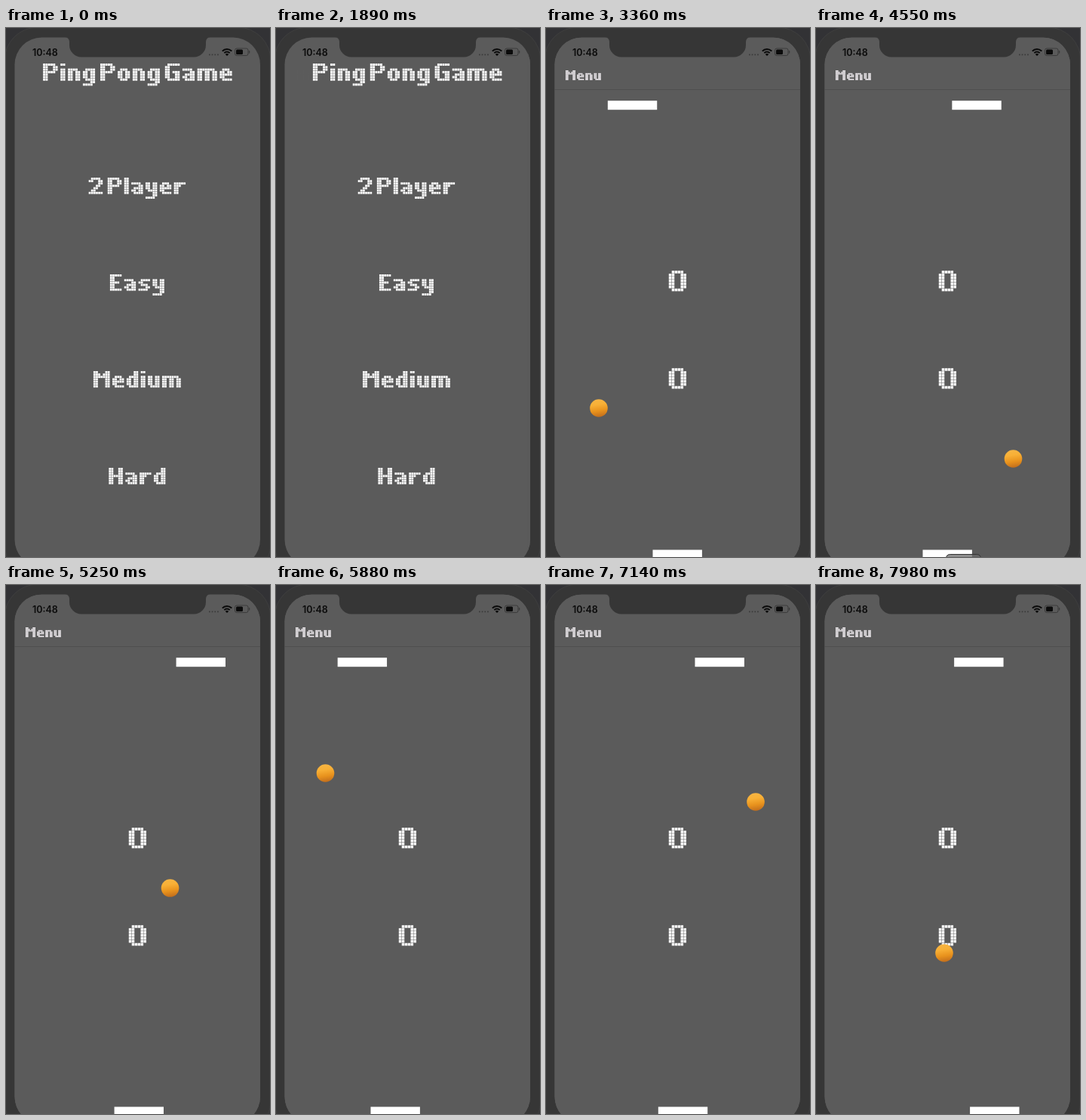
These frames come from a looping animation (350x700 px, 8 s). An HTML page with a canvas:

```html
<!DOCTYPE html>
<html lang="en">
<head>
<meta charset="utf-8">
<title>Ping Pong Game</title>
<style>
html, body { margin: 0; height: 100%; overflow: hidden; background: #363636; }
canvas { display: block; width: 350px; height: 700px; }
</style>
</head>
<body>
<canvas id="stage" width="350" height="700"></canvas>
<script>
const ctx = document.getElementById('stage').getContext('2d');
const LOOP = 8000, STEP = 70, SCREEN = '#5b5b5b', BEZEL = '#363636';

// Stroke font: each word is a polyline of "xy" grid points, "," lifts the pen.
// The pen is two cells wide and one cell high.
const GLYPHS = {
  P: '06 00 30 41 42 33 03', E: '30 00 06 36 , 03 23', M: '06 00 22 32 50 56',
  G: '40 10 01 05 16 46 43 33', H: '00 06 , 03 43 , 40 46',
  a: '02 22 33 36 16 05 14 34', d: '30 36 16 05 03 12 32',
  e: '36 16 05 03 12 22 33 34 04', g: '36 16 05 03 12 32 37 28 08',
  i: '00 00 , 02 06', l: '00 06', m: '06 02 52 63 66 , 33 36',
  n: '06 02 22 33 36', o: '12 22 33 35 26 16 05 03 12', r: '06 02 , 13 22 32',
  s: '32 12 03 14 24 35 26 06', u: '02 05 16 36 32',
  y: '02 04 15 35 , 32 37 28 08',
  0: '10 30 41 45 36 16 05 01 10', 2: '01 10 30 41 42 06 46'
};

function rasterize(strokes) {
  const cells = new Set();
  for (const stroke of strokes.split(' , ')) {
    const points = stroke.split(' ').map(p => [+p[0], +p[1]]);
    for (let i = 1; i < points.length; i++) {
      const [x0, y0] = points[i - 1], [x1, y1] = points[i];
      const n = Math.max(Math.abs(x1 - x0), Math.abs(y1 - y0), 1);
      for (let k = 0; k <= n; k++) {
        const x = Math.round(x0 + (x1 - x0) * k / n);
        const y = Math.round(y0 + (y1 - y0) * k / n);
        cells.add(x + ' ' + y).add(x + 1 + ' ' + y);
      }
    }
  }
  const list = [...cells].map(c => c.split(' ').map(Number));
  return { list, advance: Math.max(...list.map(c => c[0])) + 2 };
}
const font = { ' ': { list: [], advance: 1 } };
for (const ch in GLYPHS) font[ch] = rasterize(GLYPHS[ch]);

function pixelText(text, x, y, cell, color = '#fafafa') {
  ctx.fillStyle = color;
  for (const ch of text) {
    for (const [cx, cy] of font[ch].list)
      ctx.fillRect(x + cx * cell, y + cy * cell, cell * 0.9, cell * 0.9);
    x += font[ch].advance * cell;
  }
}

function centredText(text, x, y, cell, color) {
  const cells = [...text].reduce((sum, ch) => sum + font[ch].advance, -1);
  pixelText(text, x - cells * cell / 2, y, cell, color);
}

const clamp = v => Math.min(1, Math.max(0, v));

// Piecewise linear value through [time, value] keys.
function track(keys, t) {
  let i = 1;
  while (i < keys.length - 1 && t > keys[i][0]) i++;
  const [t0, a] = keys[i - 1], [t1, b] = keys[i];
  return a + (b - a) * clamp((t - t0) / (t1 - t0));
}

// Reflects a straight run between two walls.
function bounce(v, lo, hi) {
  const span = hi - lo, m = (((v - lo) % (2 * span)) + 2 * span) % (2 * span);
  return lo + (m < span ? m : 2 * span - m);
}

const TRAVEL = [[2927, 0], [3360, 104], [4550, 389.5], [5880, 710.5], [7140, 1008], [7980, 1208]];
const PLAYER = [[4550, 174.2], [4900, 182], [5390, 174], [5880, 158.2], [6400, 158],
  [7140, 181.5], [7400, 172], [7840, 238], [7980, 236.8]];
const ballX = t => bounce(174 - track(TRAVEL, t), 23, 324);
const ballY = t => bounce(399 + track(TRAVEL, t), 119.25, 679.25);

// The computer's paddle chases the ball with a smooth lag.
function rivalX(t) {
  let x = 174.3;
  for (let u = 2920; u < t; u += 10) x += (ballX(u - 20) - x) * 0.0545;
  return x;
}

function roundRect(x, y, w, h, r) {
  ctx.beginPath();
  ctx.roundRect(x, y, w, h, r);
}

function paddle(x, y) {
  ctx.fillStyle = '#fff';
  ctx.fillRect(x - 32.7, y, 65.4, 12);
}

function drawBall(x, y) {
  const g = ctx.createLinearGradient(x - 2, y - 12, x + 2, y + 12);
  g.addColorStop(0, '#f6b544');
  g.addColorStop(0.3, '#f8b036');
  g.addColorStop(0.65, '#e8921d');
  g.addColorStop(1, '#c06c1c');
  ctx.fillStyle = g;
  ctx.beginPath();
  ctx.arc(x, y, 11.8, 0, 7);
  ctx.fill();
}

function drawMenu(slide) {
  ctx.save();
  ctx.translate(-98 * slide, 0);
  ['2 Player', 'Easy', 'Medium', 'Hard'].forEach((label, i) =>
    centredText(label, 174, 198 + 128 * i, 3.14));
  ctx.restore();
  ctx.fillStyle = `rgba(0,0,0,${0.09 * slide})`;
  ctx.fillRect(11, 82, 326, 618);
}

function drawGame(t, slide) {
  ctx.save();
  ctx.translate(326 * (1 - slide), 0);
  ctx.fillStyle = SCREEN;
  ctx.fillRect(11, 13, 326, 700);
  pixelText('0', 162.8, 321.2, 3.93);
  pixelText('0', 162.8, 450.2, 3.93);
  paddle(rivalX(t), 96.2);
  paddle(track(PLAYER, t), 690.5);
  drawBall(ballX(t), ballY(t));
  ctx.restore();
  if (t >= 4410 && t < 4690) {
    roundRect(track([[4410, 247], [4550, 172.5]], t), 696.5, 46, 14, 5);
    ctx.fillStyle = 'rgba(105,105,105,.75)';
    ctx.fill();
    ctx.strokeStyle = '#333';
    ctx.lineWidth = 1;
    ctx.stroke();
  }
}

function drawNavBar(t, slide) {
  const x = 174.5 - 21 * slide, alpha = clamp(1 - slide / 0.7);
  if (alpha) centredText('Ping Pong Game', x, 47, 3.3, `rgba(250,250,250,${alpha})`);
  else if (t < 2660) centredText('Ping Pong Game', x, 47, 3.3, 'rgba(0,0,0,.04)');
  if (slide) {
    ctx.fillStyle = `rgba(0,0,0,${0.13 * slide})`;
    ctx.fillRect(11, 81, 326, 1);
    pixelText('Menu', 26, 56, 1.88, `rgba(250,246,250,${slide})`);
  }
}

function drawStatusBar() {
  ctx.fillStyle = ctx.strokeStyle = '#0b0b0b';
  ctx.font = '600 12.5px Inter, sans-serif';
  ctx.fillText('10:48', 35, 36.7);
  ctx.lineWidth = 2;
  for (const r of [5, 8.5]) {
    ctx.beginPath();
    ctx.arc(293, 36.5, r, -Math.PI * 0.76, -Math.PI * 0.24);
    ctx.stroke();
  }
  ctx.beginPath();
  ctx.moveTo(293, 37);
  ctx.arc(293, 37, 3, -Math.PI * 0.76, -Math.PI * 0.24);
  ctx.fill();
  roundRect(305, 28.5, 9, 6.5, 1.5);
  ctx.fill();
  ctx.globalAlpha = 0.4;
  for (let i = 0; i < 4; i++) ctx.fillRect(269 + i * 3.7, 34.5, 1.7, 1.7);
  ctx.lineWidth = 1;
  roundRect(303.5, 27, 17.5, 9.5, 2.5);
  ctx.stroke();
  ctx.fillRect(322, 30, 1.2, 3.5);
  ctx.globalAlpha = 1;
}

function drawNotch() {
  ctx.fillStyle = BEZEL;
  ctx.beginPath();
  ctx.moveTo(77, 12);
  ctx.arcTo(84, 12.5, 84, 20, 6);
  ctx.arcTo(84, 38.5, 102, 38.5, 16);
  ctx.arcTo(265, 38.5, 265, 20, 16);
  ctx.arcTo(265, 12.5, 272, 12, 6);
  ctx.lineTo(272, 12);
  ctx.fill();
}

function draw(t) {
  const u = Math.max(0, t - 1880) * 0.01445;
  const slide = t > 2660 ? 1 : 1 - Math.exp(-u) * (1 + u);

  ctx.fillStyle = '#323235';
  ctx.fillRect(0, 0, 350, 700);
  roundRect(-2, -1, 353, 728, 44);
  ctx.fillStyle = BEZEL;
  ctx.fill();
  ctx.strokeStyle = '#3f3f3f';
  ctx.lineWidth = 1;
  ctx.stroke();

  ctx.save();
  roundRect(11.5, 12.5, 325.5, 700.5, 36);
  ctx.clip();
  ctx.fillStyle = SCREEN;
  ctx.fillRect(0, 0, 350, 700);
  if (slide < 1) drawMenu(slide);
  if (slide > 0) drawGame(t, slide);
  drawNavBar(t, slide);
  drawStatusBar();
  ctx.restore();
  drawNotch();
}

const start = performance.now();
function tick() {
  const t = (performance.now() - start) % LOOP;
  draw(Math.floor(t / STEP) * STEP);
  requestAnimationFrame(tick);
}
tick();
</script>
</body>
</html>
```
